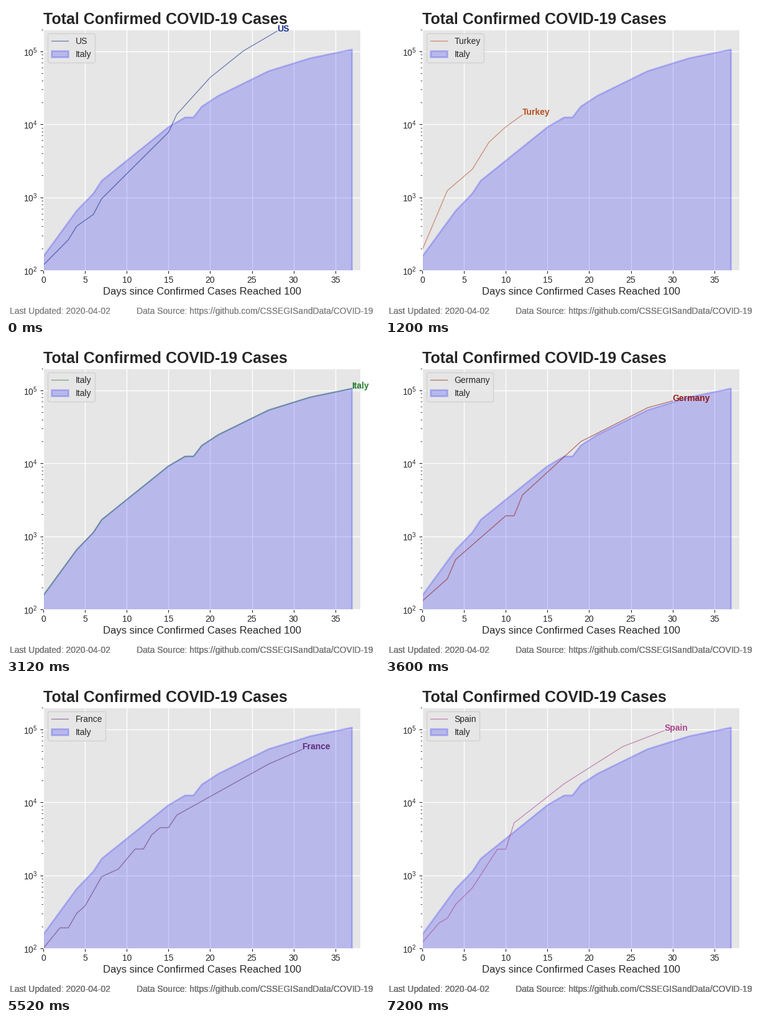
Write a matplotlib script that moves like this. It is 600x500 px and loops after 8000 ms.

```python
import numpy as np
import matplotlib.pyplot as plt
from matplotlib.animation import FuncAnimation

INK = "0.15"
plt.rcParams.update({
    "font.family": "Liberation Sans",
    "font.size": 10,
    "mathtext.fontset": "custom",
    "mathtext.rm": "Liberation Sans",
    "text.color": INK,
    "axes.labelcolor": INK,
    "xtick.color": INK,
    "ytick.color": INK,
    "axes.facecolor": "0.9",
    "axes.edgecolor": "white",
    "axes.axisbelow": True,
    "axes.grid": True,
    "grid.color": "white",
    "grid.linewidth": 1,
})


def growth(knots, stalls=()):
    """Exponential growth between knots {day: cases}, flat on stall days."""
    known = list(knots)
    days = np.arange(known[-1] + 1)
    cases = np.exp(np.interp(days, known, np.log(list(knots.values()))))
    for day in stalls:
        cases[day] = cases[day - 1]
    return cases


# Knots sit where the growth rate changes; day 0 is the 100th case.
ITALY = growth({0: 155, 4: 655, 6: 1130, 7: 1690, 15: 9170, 17: 12460,
                21: 24700, 27: 53600, 32: 80600, 37: 105800}, stalls=[18])
US = growth({0: 118, 3: 262, 4: 402, 6: 583, 7: 959, 15: 7780, 16: 13700,
             20: 43800, 24: 101700, 28: 188200})
TURKEY = growth({0: 192, 3: 1236, 6: 2430, 8: 5700, 10: 9220, 12: 13530})
GERMANY = growth({0: 130, 3: 262, 4: 482, 10: 1910, 12: 3675, 19: 19850,
                  27: 57700, 30: 71800}, stalls=[11])
FRANCE = growth({0: 100, 2: 191, 5: 380, 7: 959, 9: 1220, 11: 2290, 14: 4500,
                 16: 6680, 27: 33400, 31: 52800}, stalls=[3, 12, 15])
UK = growth({0: 116, 3: 274, 6: 459, 9: 1144, 11: 1550, 13: 2640, 22: 14750,
             26: 25500}, stalls=[7, 10, 14])
SPAIN = growth({0: 120, 2: 222, 3: 259, 4: 400, 6: 673, 9: 2280, 11: 5230,
                17: 17960, 24: 57800, 29: 95900}, stalls=[10])

SCENES = [
    ("US", US, "#001c7f"),
    ("Turkey", TURKEY, "#b1400d"),
    ("Italy", ITALY, "#12711c"),
    ("Germany", GERMANY, "#8c0800"),
    ("France", FRANCE, "#591e71"),
    ("United Kingdom", UK, "#592f0d"),
    ("Spain", SPAIN, "#a23582"),
]
STEP = 400          # ms per tick
TICKS_PER_SCENE = 3
TICKS = 20

fig = plt.figure(figsize=(6, 5), dpi=100, facecolor="white")
fig.subplots_adjust(left=0.1, right=0.95, bottom=0.15, top=0.925)
ax = fig.add_subplot()
ax.set_yscale("log")
ax.set_xlim(0, 38)
ax.set_ylim(100, 2e5)
ax.tick_params(axis="x", pad=2.7)
ax.set_title("Total Confirmed COVID-19 Cases", loc="left", fontsize=18,
             fontweight="bold")
ax.set_xlabel("Days since Confirmed Cases Reached 100", fontsize=12,
              labelpad=3.3)

area = ax.fill_between(range(len(ITALY)), ITALY, 1, color="blue", alpha=0.2,
                       linewidth=2, label="Italy")
line, = ax.plot([], [], linewidth=1, alpha=0.5)
label = ax.text(0, 100, "", fontweight="bold", alpha=0.9)


def add_footer():
    return [
        fig.text(0.01, 0.01, "Last Updated: 2020-04-02", color="gray"),
        fig.text(0.35, 0.01, "Data Source: https://github.com/"
                 "CSSEGISandData/COVID-19", color="gray"),
    ]


# The footer is printed once more per scene, so its edges grow heavier.
footers = [add_footer() for _ in range(len(SCENES) + 1)]


def draw(tick):
    scene = min(tick // TICKS_PER_SCENE, len(SCENES) - 1)
    name, cases, color = SCENES[scene]
    line.set_data(range(len(cases)), cases)
    line.set_color(color)
    line.set_label(name)
    label.set_text(name)
    label.set_color(color)
    label.set_position((len(cases) - 1, cases[-1]))
    ax.legend(handles=[line, area], loc="upper left")
    for i, pair in enumerate(footers):
        for text in pair:
            text.set_visible(i < scene + 2)
    return line, label


anim = FuncAnimation(fig, draw, frames=TICKS, init_func=lambda: draw(0),
                     interval=STEP, repeat=True, repeat_delay=0, blit=False)
plt.show()
```
